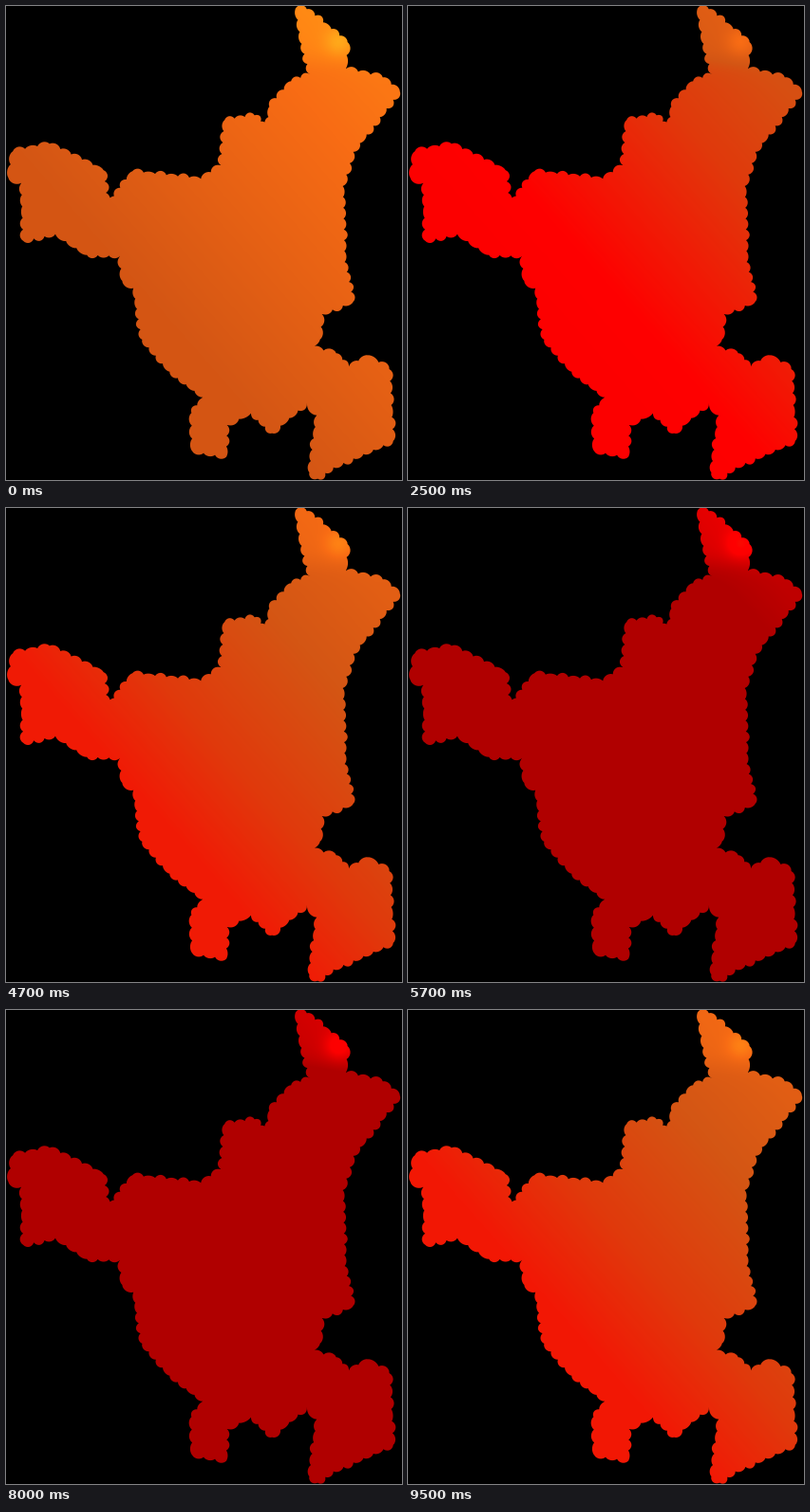
A matplotlib script that plays this animation: 417x500 px, repeating every 9600 ms.

```python
import numpy as np
import matplotlib.pyplot as plt
from matplotlib.animation import FuncAnimation
from matplotlib.colors import LinearSegmentedColormap
from matplotlib.patches import Polygon

W, H, DPI = 417, 500, 64
MONTHS, YEARS = 12, 8

# Main corners of the region, clockwise from the northern tip.
CORNERS = [
    (305, 2), (317, 3), (360, 38), (358, 66), (397, 75), (415, 90),
    (366, 154), (355, 190), (357, 270), (366, 312), (333, 325), (331, 352),
    (321, 360), (348, 366), (361, 380), (381, 368), (404, 383), (408, 459),
    (345, 487), (328, 499), (319, 492), (327, 432), (317, 419), (280, 451),
    (258, 430), (233, 442), (232, 476), (196, 470), (195, 429), (207, 413),
    (172, 386), (143, 352), (134, 298), (122, 290), (120, 264), (85, 263),
    (52, 241), (18, 248), (16, 187), (2, 181), (7, 153), (46, 145),
    (103, 173), (107, 209), (133, 174), (205, 182), (226, 168), (230, 120),
    (262, 115), (275, 128), (277, 106), (300, 79), (320, 72), (311, 40),
]

T_MIN, T_MAX = 8, 20
STOPS = [
    (8, "#ffa81a"), (10, "#ff8414"), (11.5, "#f86c14"), (14, "#d45614"),
    (15.3, "#e03a0c"), (17, "#ff0000"), (17.8, "#fc0000"), (20, "#b00000"),
]


def scalloped(corners, step=12):
    """Turn straight sides into rows of uneven outward bumps."""
    rng = np.random.default_rng(4)
    arch = np.linspace(0, 1, 8, endpoint=False)
    pts = []
    for a, b in zip(corners, corners[1:] + corners[:1]):
        a, b = np.array(a, float), np.array(b, float)
        side = b - a
        length = np.hypot(*side)
        out = np.array([side[1], -side[0]]) / length
        bumps = max(1, round(length / step))
        for i in range(bumps):
            depth = rng.uniform(1.5, 4)
            for t in arch:
                lift = depth * np.sin(np.pi * t) ** 0.7 - 0.4
                pts.append(a + (i + t) / bumps * side + lift * out)
    return pts


x, y = np.meshgrid(np.arange(W) + 0.5, np.arange(H) + 0.5)
north_east = np.clip((250 * (x - 150) - 220 * (y - 310)) / 110900, 0, 1)
hills = 1.2 / (1 + np.exp((y - 58) / 6))
peak = 1.7 * np.exp(-((x - 350) ** 2 + (y - 38) ** 2) / 200)
cooling = 3.2 * north_east + hills + peak


def temperature(frame):
    """Seasonal warmth, capped in summer, minus the cooling of the terrain."""
    year, month = divmod(frame, MONTHS)
    season = 14 * np.sin(np.pi * (month + 0.2) / MONTHS)
    drift = 0.12 * np.sin(2.1 * year)
    return 13.3 + min(season, 10) + drift - cooling


cmap = LinearSegmentedColormap.from_list(
    "heat", [((t - T_MIN) / (T_MAX - T_MIN), c) for t, c in STOPS], N=512)

fig = plt.figure(figsize=(W / DPI, H / DPI), dpi=DPI, facecolor="black")
ax = fig.add_axes([0, 0, 1, 1])
ax.axis("off")
heat = ax.imshow(temperature(0), cmap=cmap, vmin=T_MIN, vmax=T_MAX,
                 extent=(0, W, H, 0), aspect="auto", interpolation="nearest")
ax.set_xlim(0, W)
ax.set_ylim(H, 0)
heat.set_clip_path(Polygon(scalloped(CORNERS), transform=ax.transData))


def update(frame):
    heat.set_data(temperature(frame))
    return [heat]


anim = FuncAnimation(fig, update, frames=MONTHS * YEARS, interval=100,
                     repeat=True, repeat_delay=0)
plt.show()
```
